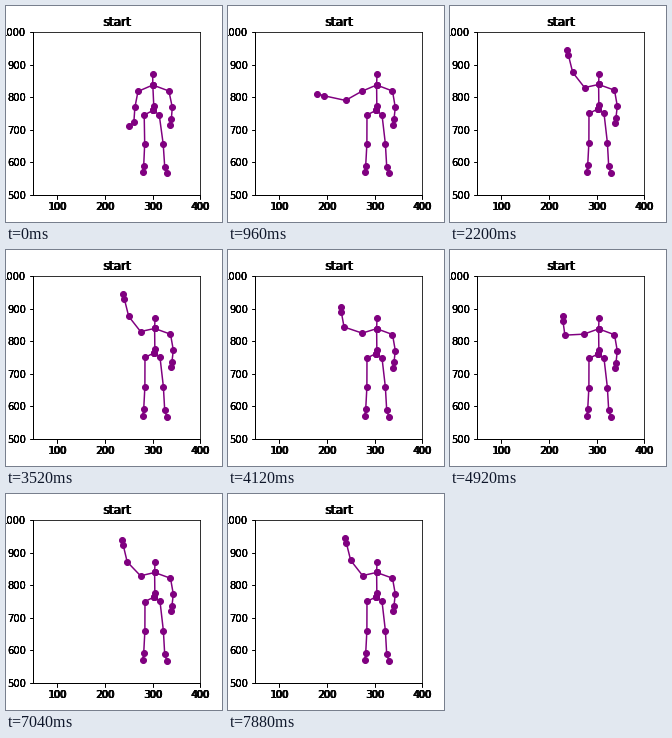
Animation, 216 px wide and 216 px high, one loop 8 s. Source, as a matplotlib script:

```python
import numpy as np
import matplotlib.pyplot as plt
from matplotlib.animation import FuncAnimation
from matplotlib.transforms import Affine2D

plt.rcParams.update({"font.size": 10, "font.family": "DejaVu Sans"})

STEP, LOOP = 40, 8000
SENSOR = 70  # ms between skeleton readings
X0, X1, Y0, Y1 = 50, 400, 500, 1000

# Resting joints in stage pixels, y down
REST = {
    "head": (146.7, 68.4), "neck": (146.8, 79), "spine": (147.8, 100.4),
    "hip": (147, 104.4), "shoulder_l": (132, 85.4),
    "shoulder_r": (162.9, 85), "elbow_r": (166.3, 101.4),
    "wrist_r": (165.3, 113.4), "hand_r": (164, 118.5),
    "hip_l": (138.2, 109), "knee_l": (138.7, 138), "ankle_l": (137.7, 159.5),
    "foot_l": (136.7, 165.5), "hip_r": (153.2, 108.7),
    "knee_r": (157.2, 138), "ankle_r": (158.7, 160.5), "foot_r": (160.7, 166.5),
}
FEET = 165.5

# Waving arm: (angle, length) of upper arm, forearm and hand
DOWN = ((259, 16.3), (266, 15), (218, 5.7))
OUT = ((209, 18.4), (167, 21.6), (164, 7.3))
UP = ((128, 19.3), (104, 17.8), (101, 5))
BENT = ((183, 19), (98, 14.2), (90, 5))
WAVE = ((0, DOWN), (960, OUT), (2060, UP), (3500, UP),
        (4480, BENT), (6200, BENT), (7200, UP), (LOOP, UP))

ARM = ("elbow_l", "wrist_l", "hand_l")
CHAINS = (
    ("head", "neck", "spine", "hip"),
    ("neck", "shoulder_l") + ARM,
    ("neck", "shoulder_r", "elbow_r", "wrist_r", "hand_r"),
    ("hip", "hip_l", "knee_l", "ankle_l", "foot_l"),
    ("hip", "hip_r", "knee_r", "ankle_r", "foot_r"),
)


def smooth(u):
    u = np.clip(u, 0, 1)
    return u * u * (3 - 2 * u)


def arm_at(t):
    for (t0, a), (t1, b) in zip(WAVE, WAVE[1:]):
        if t < t1:
            break
    a, b = np.array(a), np.array(b)
    return a + (b - a) * smooth((t - t0) / (t1 - t0))


def pose(t):
    arm = arm_at(t)
    raised = np.clip((OUT[0][0] - arm[0, 0]) / 80, 0, 1)
    sway = 2.3 * smooth(t / 960)

    # The body leans with its height and stretches most around the hips
    joints = {}
    for name, (x, y) in REST.items():
        height = max(FEET - y, 0) / 97
        joints[name] = (x + sway * height ** 2,
                        y - 1.6 * raised * np.sin(np.pi * height))

    x, y = joints["shoulder_l"]
    x, y = x + raised, y - 3 * raised
    joints["shoulder_l"] = x, y
    for name, (angle, length) in zip(ARM, arm):
        x += length * np.cos(np.radians(angle))
        y -= length * np.sin(np.radians(angle))
        joints[name] = x, y
    return joints


def to_data(points):
    """Convert stage pixels (y down) to axis units."""
    x, y = np.array(points).T
    return (X0 + (x - 27) * (X1 - X0) / 167.4,
            Y0 + (189 - y) * (Y1 - Y0) / 163.08)


def add_axes(shift=0, frame=True):
    ax = fig.add_axes([.125, .125, .775, .755])
    ax.patch.set_visible(False)
    ax.set(xlim=(X0, X1), ylim=(Y0, Y1), title="start",
           xticks=range(100, 401, 100), yticks=range(500, 1001, 100))
    ax.spines[["top", "right"]].set_visible(frame)
    for label in [ax.title, *ax.get_xticklabels()]:
        label.set_transform(label.get_transform()
                            + Affine2D().translate(shift, 0))
    return ax


fig = plt.figure(figsize=(3, 3), dpi=72, facecolor="white")
# Stacked copies give the heavy lettering
for shift in (0, 1, 1):
    add_axes(shift, frame=False)
ax = add_axes()
line, = ax.plot([], [], "o-", color="purple", lw=1.5, ms=6)


def update(i):
    joints = pose(i * STEP // SENSOR * SENSOR)
    points = []
    for chain in CHAINS:
        points += [joints[name] for name in chain] + [(np.nan, np.nan)]
    line.set_data(*to_data(points))
    return line,


anim = FuncAnimation(fig, update, frames=LOOP // STEP, interval=STEP,
                     repeat=True, repeat_delay=0)
plt.show()
```
